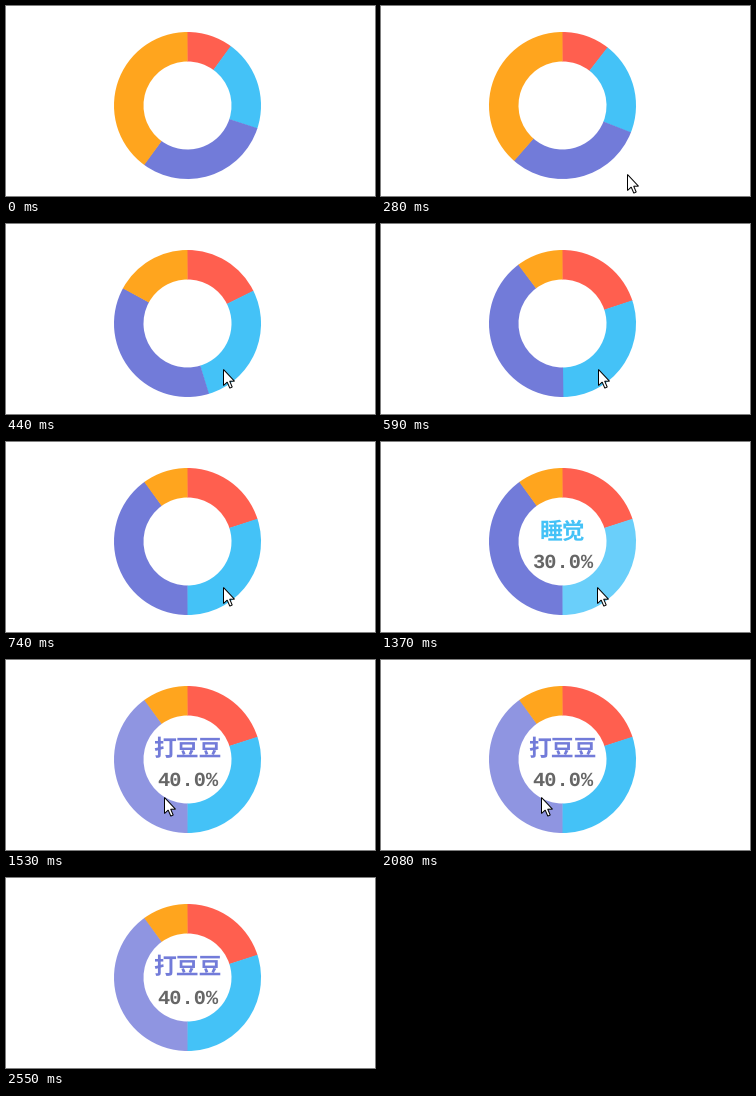
A matplotlib script for the animation above (3790 ms loop, 369x190 px).

```python
import matplotlib.pyplot as plt
from matplotlib.animation import FuncAnimation
from matplotlib.patches import Polygon, Wedge
import numpy as np

W, H, DPI = 369, 190, 100
LOOP, TICK = 3790, 10
REFRESH = 76.6  # ms between screen updates
CX, CY, R_OUT, R_IN = 181.5, 99.5, 73.5, 44.0
RED, BLUE, PURPLE, ORANGE = COLORS = ["#ff5f4f", "#44c2f7", "#727bd9", "#ffa51e"]
BLUE_LIT, PURPLE_LIT = "#6acffa", "#8f95e1"

# Each share takes over the value of its clockwise neighbour.
OLD = np.array([10, 20, 30, 40])
NEW = np.roll(OLD, -1)

SLEEP_AT, GAME_AT = 910, 1530
ENTER_AT, CROSS_AT, LEAVE_AT, GONE_AT = 210, 1370, 2080, 2550


def updates(t, start):
    """Number of screen updates since start."""
    return max(0, int((t - start) / REFRESH))


def ease(p):
    p = min(max(p, 0), 1)
    return 4 * p ** 3 if p < 0.5 else 1 - (2 - 2 * p) ** 3 / 2


def morph(t):
    if t < 130:
        return 0
    return ease((60 + updates(t, 130) * REFRESH) / 600)


def pointer(t):
    """Tip of the mouse pointer, or None while it is off the stage."""
    if not ENTER_AT <= t < GONE_AT:
        return None
    if t < CROSS_AT:
        u = min(updates(t, ENTER_AT) / 3, 1)
        rest = (1 - u) ** 2
        return 217 + 29 * rest, 145 + 23 * rest
    if t < LEAVE_AT:
        u = min(updates(t, CROSS_AT) / 2, 1)
        return 216 - 58 * u, 145 - 8 * u
    u = min(updates(t, LEAVE_AT) / 5, 1)
    return 160 + 121 * u ** 3, 137 + 50 * u


plt.rcParams["text.hinting"] = "none"
plt.rcParams["toolbar"] = "None"
fig = plt.figure(figsize=(W / DPI, H / DPI), dpi=DPI, facecolor="white")
ax = fig.add_axes([0, 0, 1, 1])
ax.set_xlim(0, W)
ax.set_ylim(H, 0)
ax.axis("off")

slices = [ax.add_patch(Wedge((CX, CY), R_OUT, 0, 90, width=R_OUT - R_IN,
                             facecolor=c, linewidth=0)) for c in COLORS]


def make_text(x, y, px, family, color):
    return ax.text(x, y, "", fontsize=px * 72 / DPI, family=family,
                   weight="bold", color=color, ha="center", va="baseline")


title = make_text(181.5, 96.5, 22.8, "Noto Sans CJK JP", BLUE)
value = make_text(181.5, 126, 20.4, "Liberation Mono", "#666666")

ARROW = np.array([(0, 0), (0, 16), (3.7, 12.6), (6.3, 18.6), (8.7, 17.5),
                  (6.2, 11.7), (11, 11.7)]) + 0.5
arrow = ax.add_patch(Polygon(ARROW, facecolor="white", edgecolor="black",
                             linewidth=0.72, joinstyle="miter", zorder=5))


def draw_ring(t):
    shares = OLD + (NEW - OLD) * morph(t)
    edges = np.append(0, np.cumsum(shares)) * 3.6 - 90
    # Lower slices reach a little under the ones above to hide the seams.
    starts, ends = edges[:-1].copy(), edges[1:] + 0.4
    starts[0] -= 0.4
    ends[-1] -= 0.4
    for wedge, a, b in zip(slices, starts, ends):
        wedge.set_theta1(a)
        wedge.set_theta2(b)


def draw_hover(t):
    sleep, game = SLEEP_AT <= t < GAME_AT, t >= GAME_AT
    slices[1].set_facecolor(BLUE_LIT if sleep else BLUE)
    slices[2].set_facecolor(PURPLE_LIT if game else PURPLE)
    title.set_text("睡觉" if sleep else "打豆豆" if game else "")
    title.set_color(PURPLE if game else BLUE)
    value.set_text("30.0%" if sleep else "40.0%" if game else "")


def draw(i):
    t = i * TICK
    draw_ring(t)
    draw_hover(t)
    tip = pointer(t)
    arrow.set_visible(tip is not None)
    if tip is not None:
        arrow.set_xy(ARROW + np.round(tip))
    return [*slices, title, value, arrow]


anim = FuncAnimation(fig, draw, frames=LOOP // TICK, interval=TICK,
                     repeat=True, repeat_delay=0, blit=False)
plt.show()
```
